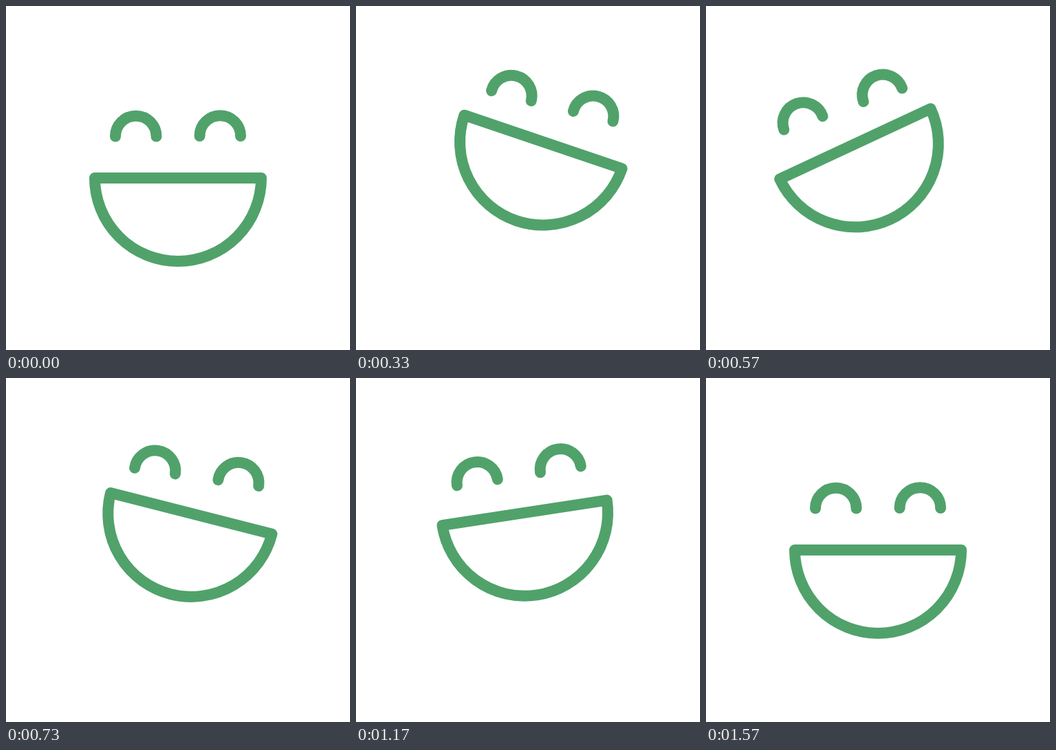
Write an HTML page that moves like this. It is 500 px wide and 500 px high and loops after 2.01 s.

```html
<!DOCTYPE html>
<html lang="en">
<head>
<meta charset="utf-8">
<title>Laughing face</title>
<style>
  html, body { margin: 0; width: 100%; height: 100%; overflow: hidden; background: #fff; }
  svg { display: block; width: 100%; height: 100%; }
</style>
</head>
<body>
<svg viewBox="0 0 500 500" fill="none" stroke="#50a26a" stroke-width="16" stroke-linecap="round" stroke-linejoin="round">
  <g id="head">
    <path d="M-91 -60.5a29.75 29.75 0 0 1 59.5 0M31.5 -61a29.75 29.75 0 0 1 59.5 0"/>
    <path id="mouth" d="M-121 0H121A121 121 0 0 1 -121 0Z"/>
  </g>
</svg>
<script>
const LOOP = 2010, STEP = 100 / 3, LAST = 47;
const head = document.getElementById('head');
const mouth = document.getElementById('mouth');

// Steps at which the head and the mouth turn back.
const headTurns = [0, 7.5, 16.5, 24.4, 31.3, 39, LAST];
const mouthTurns = [0, 8, 16.5, 22.5, 28, 34];

const ease = t => (1 - Math.cos(Math.PI * Math.min(1, Math.max(0, t)))) / 2;

// Swings between +1 and -1 from rest to rest; the last swing reaches lastPeak.
function swing(step, turns, lastPeak) {
  const end = turns.length - 1;
  const peak = i => i % end === 0 ? 0 : (i % 2 ? 1 : -1) * (i === end - 1 ? lastPeak : 1);
  const i = turns.findIndex(turn => step < turn);
  if (i < 1) return 0;
  const t = (step - turns[i - 1]) / (turns[i] - turns[i - 1]);
  return peak(i - 1) + (peak(i) - peak(i - 1)) * ease(t);
}

function draw(now) {
  // 30 steps per second, timed in hundredths, then a rest.
  const time = Math.floor((now % LOOP) / 10) * 10;
  const step = Math.min(LAST, Math.floor((time + 4) / STEP));

  const sway = swing(step, headTurns, 0.86);
  const tilt = step < LAST ? 19.2 * swing(step - 0.4, headTurns, 0.41) : 0;
  const jump = ease(step / 9) * ease((LAST - step) / 9);
  const y = 5 * sway * sway - 47.8 * jump;
  head.setAttribute('transform', `translate(${250 + 31.5 * sway} ${250 + y}) rotate(${tilt})`);

  const mouthLift = -7 * ease(step / 8) * ease((40 - step) / 6);
  const mouthTilt = 6 * swing(step, mouthTurns, 1);
  mouth.setAttribute('transform', `translate(0 ${mouthLift}) rotate(${mouthTilt})`);
}

const start = performance.now();
function tick() {
  draw(performance.now() - start);
  requestAnimationFrame(tick);
}
tick();
</script>
</body>
</html>
```
